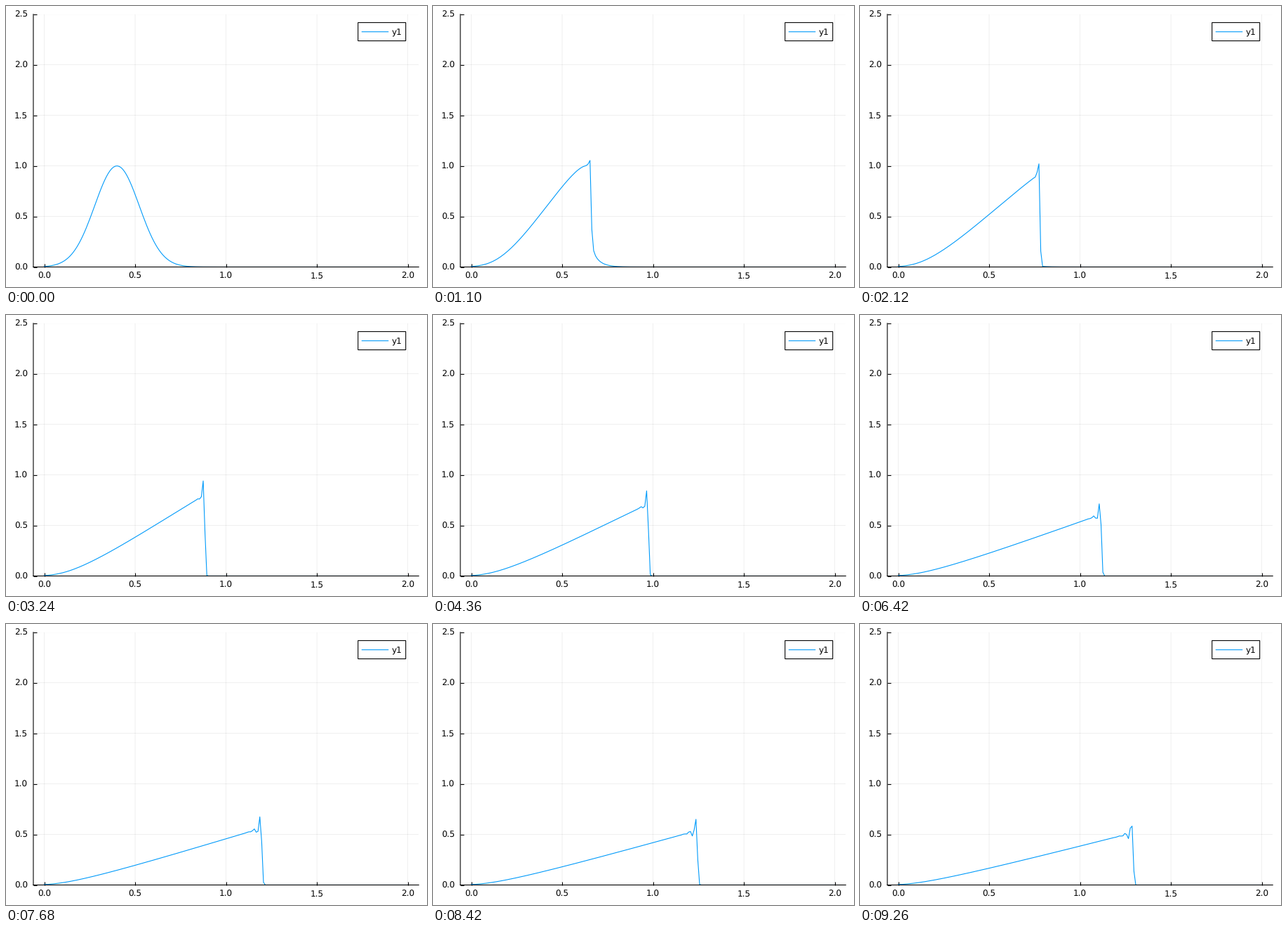
A matplotlib script that plays this animation: 600 by 400 pixels, repeating every 9.28 s.

```python
import numpy as np
import matplotlib.pyplot as plt
from matplotlib.animation import FuncAnimation
from matplotlib.patches import Rectangle

W, H, DPI = 600, 400, 100
PX = 72 / DPI
BLUE = "#009afa"
N = 200
TICK_MS, LOOP_MS = 20, 9280
LEFT, RIGHT, TOP, BOTTOM = 38.96, 588.2, 11.8, 371.5
XLIM, YLIM = (-0.06, 2.06), (0, 2.5)


def solve(x, steps):
    """Burgers' equation with the Lax-Wendroff scheme, dt = dx."""
    u = np.exp(-(x - 0.4) ** 2 / 0.03)
    states = [u]
    for _ in range(steps - 1):
        f = u ** 2 / 2
        speed = (u[1:] + u[:-1]) / 2
        flux = (f[1:] + f[:-1]) / 2 - speed * np.diff(f) / 2
        u = u.copy()
        u[1:-1] -= np.diff(flux)
        states.append(u)
    return states


x = np.linspace(0, 2, N)
states = solve(x, N)

# Every third state is held five ticks, the others one.
holds = np.where(np.arange(N) % 3 == 1, 5, 1)
order = np.repeat(np.arange(N), holds)[:LOOP_MS // TICK_MS]

plt.rcParams.update({"font.family": "DejaVu Sans", "font.size": 12 * PX,
                     "text.hinting": "no_hinting", "path.snap": False})
fig = plt.figure(figsize=(W / DPI, H / DPI), dpi=DPI, facecolor="white")

xticks, yticks = np.arange(0, 2.1, 0.5), np.arange(0, 2.6, 0.5)
ax = fig.add_axes([LEFT / W, 1 - BOTTOM / H,
                   (RIGHT - LEFT) / W, (BOTTOM - TOP) / H])
ax.set(xlim=XLIM, ylim=YLIM, xticks=xticks, yticks=yticks)
ax.spines[["top", "right"]].set_visible(False)
ax.spines[["left", "bottom"]].set_linewidth(1.1 * PX)
ax.tick_params(direction="in", length=5 * PX, width=1.1 * PX,
               labelleft=False, labelbottom=False)
ax.grid(color="black", alpha=0.1, linewidth=0.6 * PX)
ax.set_axisbelow(True)
curve, = ax.plot(x, states[0], color=BLUE, lw=1.1 * PX)

# Labels and legend, laid out in pixels
page = fig.add_axes([0, 0, 1, 1])
page.set(xlim=(0, W), ylim=(H, 0))
page.axis("off")
for v in xticks:
    page.text(np.interp(v, XLIM, (LEFT, RIGHT)), 388, f"{v:.1f}", ha="center")
for v in yticks:
    page.text(31, np.interp(v, YLIM, (BOTTOM, TOP)) + 4.4, f"{v:.1f}",
              ha="right")
page.add_patch(Rectangle((501.7, 23.6), 68, 26, fc="white", ec="black",
                         lw=1.1 * PX))
page.plot([507.3, 544.7], [36.7, 36.7], color=BLUE, lw=1.1 * PX)
page.text(550, 41, "y1")


def draw(i):
    curve.set_ydata(states[order[i]])
    return curve,


anim = FuncAnimation(fig, draw, frames=len(order), interval=TICK_MS,
                     repeat=True, repeat_delay=0)
plt.show()
```
